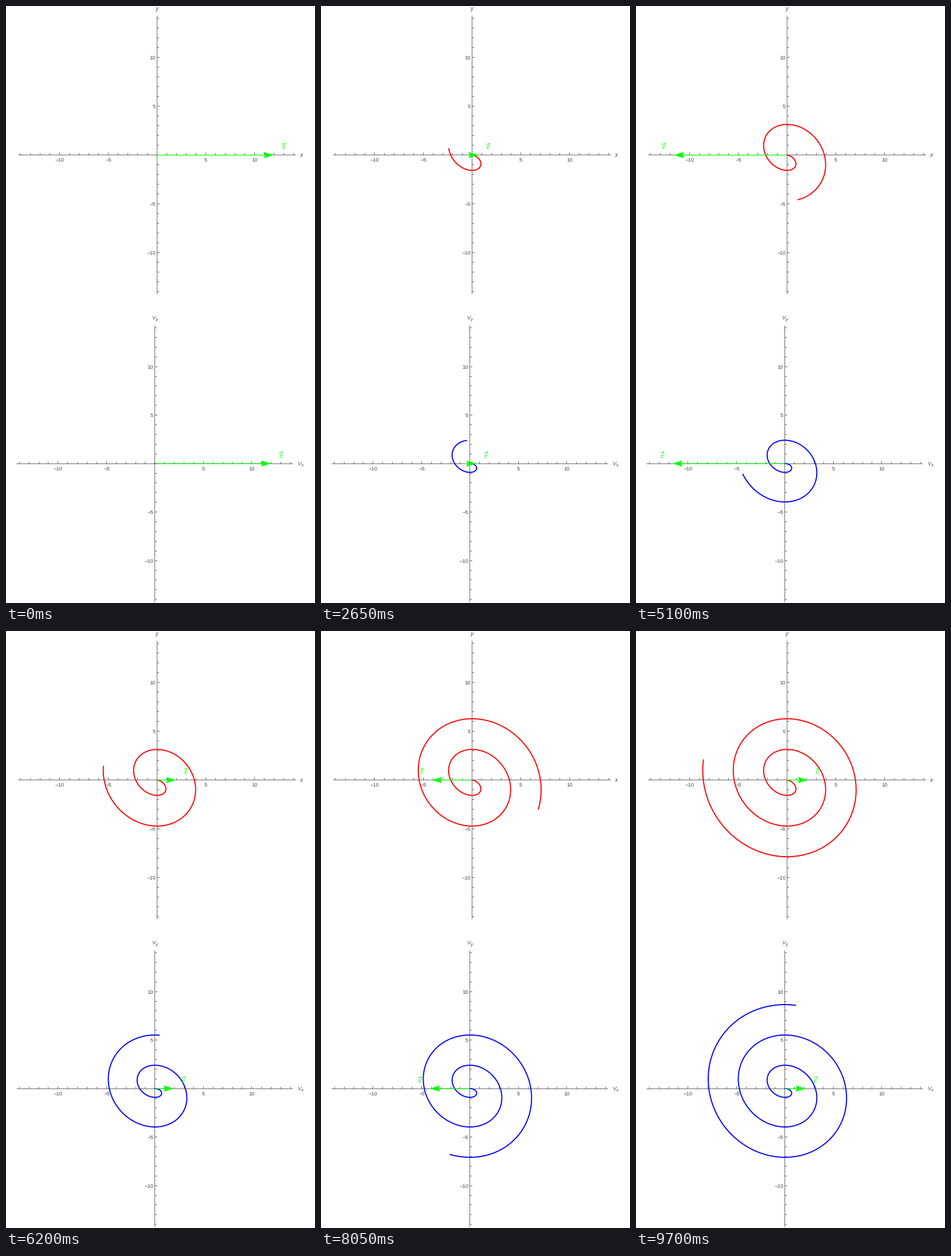
A matplotlib script that plays this animation: 539x1040 px, repeating every 9750 ms.

```python
import numpy as np
import matplotlib.pyplot as plt
from matplotlib.animation import FuncAnimation
from matplotlib.collections import LineCollection
from matplotlib.patches import Polygon

W, H, DPI = 539, 1040, 100
PT = 72 / DPI            # points per pixel
FRAMES, INTERVAL = 195, 50
DT = 0.09                # phase advance per frame
FIELD = 12               # drawn amplitude of the driving field
GREY, TEXT, GREEN = "0.4", "0.3", "#00ff00"

plt.rcParams["font.family"] = "Liberation Sans"

fig = plt.figure(figsize=(W / DPI, H / DPI), dpi=DPI, facecolor="white")
ax = fig.add_axes([0, 0, 1, 1])
ax.set_xlim(0, W)
ax.set_ylim(H, 0)
ax.axis("off")


def position(t):
    return t * np.sin(t) / 2, (t * np.cos(t) - np.sin(t)) / 2


def velocity(t):
    return (t * np.cos(t) + np.sin(t)) / 2, -t * np.sin(t) / 2


def label(x, y, text, size=9.5, ha="center", color=TEXT, style="normal"):
    return ax.text(x, y, text, fontsize=size * PT, ha=ha, va="baseline",
                   color=color, style=style, zorder=6)


def pixel(v):
    """Centre of the pixel that holds v, so thin lines stay crisp."""
    return np.floor(v) + 0.5


class Plot:
    def __init__(self, origin, scale, reach, path, color):
        self.ox, self.oy = origin
        self.scale, self.path = scale, path
        self.draw_axes(reach)
        self.curve, = ax.plot([], [], color=color, lw=1.9 * PT, zorder=2,
                              solid_capstyle="projecting",
                              solid_joinstyle="round")
        self.shaft, = ax.plot([], [], color=GREEN, lw=1.2 * PT, zorder=3,
                              solid_capstyle="butt", snap=False)
        self.head = Polygon([(0, 0)] * 4, closed=True, fc=GREEN, ec="none",
                            zorder=4, snap=False)
        ax.add_patch(self.head)
        self.letter = label(0, self.oy - 10.5, "E", 9.2, color=GREEN,
                            style="italic")
        self.harpoon, = ax.plot([], [], color=GREEN, lw=1 * PT, zorder=6,
                                snap=False)

    def draw_axes(self, reach):
        ox, oy = pixel(self.ox), pixel(self.oy)
        lines = [[(ox - reach, oy), (ox + reach, oy)],
                 [(ox, oy - reach), (ox, oy + reach)]]
        for n in range(-14, 15):
            if n == 0:
                continue
            size = 4.5 if n % 5 == 0 else 3.5
            x = pixel(self.ox + n * self.scale)
            y = pixel(self.oy - n * self.scale)
            lines += [[(x, oy), (x, oy - size)], [(ox, y), (ox + size, y)]]
            if n % 5 == 0:
                text = str(n).replace("-", "\u2212")
                label(x, oy + 11.5, text)
                label(ox - 2.5, y + 3.3, text, ha="right")
        axes = LineCollection(lines, colors=GREY, linewidths=1 * PT, zorder=1)
        axes.set_snap(False)
        ax.add_collection(axes)

    def update(self, t):
        x, y = self.path(np.linspace(0, max(t, 0.02), 40 + int(t * 25)))
        self.curve.set_data(self.ox + x * self.scale, self.oy - y * self.scale)

        field = FIELD * np.cos(t)
        side = 1 if field >= 0 else -1
        tip, y = self.ox + field * self.scale, self.oy
        size = 1.07 * self.scale
        notch = tip - side * 0.85 * size
        back = tip - side * size
        if (notch - self.ox) * side > 0:
            self.shaft.set_data([self.ox, notch], [y, y])
        else:
            self.shaft.set_data([], [])
        self.head.set_xy([(tip, y), (back, y - 5.3), (notch, y),
                          (back, y + 5.3)])

        mid = tip + side * self.scale
        top = y - 19
        self.letter.set_x(mid - 0.2)
        self.harpoon.set_data([mid - 3, mid + 3, mid + 1.2],
                              [top, top, top - 1.6])
        return self.curve, self.shaft, self.head, self.letter, self.harpoon


plots = [Plot((263.5, 259.7), 17, 242.5, position, "red"),
         Plot((259.8, 797.1), 16.9, 241, velocity, "blue")]

label(515, 263, "x", 10, style="italic")
label(263, 8.5, "y", 10, style="italic")
for x, y, axis in ((511.5, 800.5, "x"), (257.5, 545.5, "y")):
    label(x, y, "V", 9.5, style="italic")
    label(x + 5.2, y + 2, axis, 8.5, style="italic")


def update(i):
    return [artist for plot in plots for artist in plot.update(i * DT)]


anim = FuncAnimation(fig, update, frames=FRAMES, interval=INTERVAL,
                     repeat=True, repeat_delay=0, blit=False)
plt.show()
```
